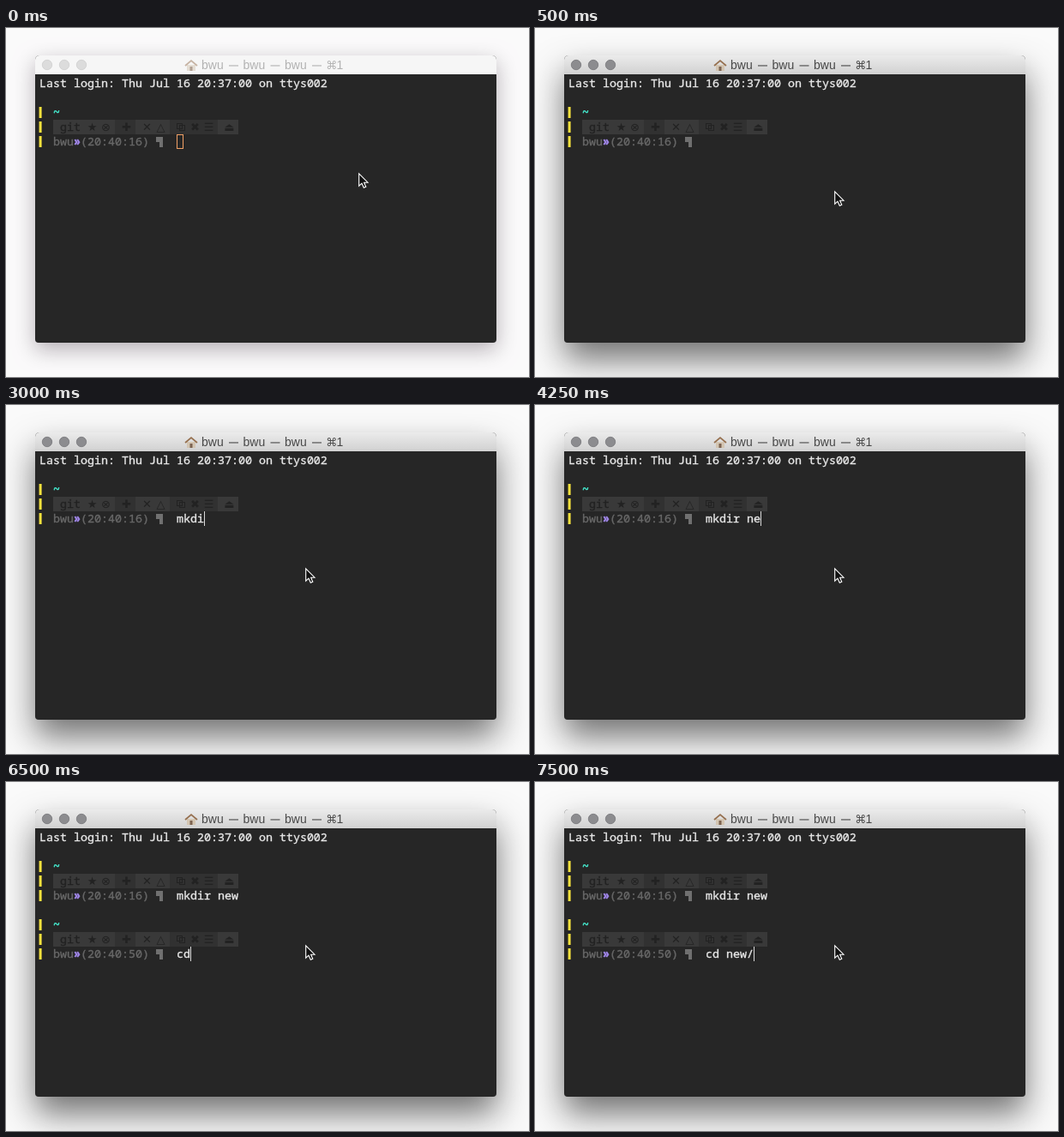
An HTML page with a canvas that plays this animation: 610 by 407 pixels, repeating every 8 s.

```html
<!DOCTYPE html>
<html lang="en">
<head>
<meta charset="utf-8">
<title>Terminal</title>
<style>
html, body { margin: 0; width: 100%; height: 100%; overflow: hidden; background: #fafafa; }
canvas { display: block; }
</style>
</head>
<body>
<canvas id="stage" width="610" height="407"></canvas>
<script>
const c = document.getElementById('stage').getContext('2d');
const LOOP = 8000, FOCUS = 500, BLINK = 500, TICK = 250;
const CELL = 8, ROW = 17, LEFT = 39, TOP = 56, CMD_COL = 20;
const WIN = { x: 34, y: 32, w: 538, h: 335, bar: 22 };
const MONO = '13.333px "Noto Sans Mono", "DejaVu Sans Mono", monospace';
const SANS = '14px "Liberation Sans", Arial, sans-serif';
const SYMBOL = '13px "DejaVu Sans", sans-serif';
const USER = 'bwu', ICONS = '★ ⊗  ✚  ✕ △    ✖ ☰  ⏏';

// Each command is typed in pairs of letters, then letter by letter.
const commands = [
  { row: 4, from: 0, clock: '20:40:16', text: 'mkdir new', start: 2500, pairs: 3, pairTime: 500 },
  { row: 8, from: 5750, clock: '20:40:50', text: 'cd new/', start: 6500, pairs: 2, pairTime: 250 }
];

const colX = col => LEFT + col * CELL;
const rowY = row => TOP + row * ROW;
const steps = (t, start, every) => Math.max(0, Math.floor((t - start) / every) + 1);

function typedCount({ text, start, pairs, pairTime }, t) {
  const paired = Math.min(pairs, steps(t, start, pairTime));
  const single = steps(t, start + pairs * pairTime, TICK);
  return Math.min(text.length, 2 * paired + single);
}

function caretOn({ text, from, start, pairs, pairTime }, t) {
  const lastKey = start + pairs * pairTime + (text.length - 2 * pairs - 1) * TICK;
  const busy = t < from + BLINK || (t >= start && t < lastKey + BLINK);
  return busy || Math.floor(t / BLINK) % 2 === 0;
}

function rect(x, y, w, h, color) {
  c.fillStyle = color;
  c.fillRect(x, y, w, h);
}

function roundRect(x, y, w, h, radii, fill) {
  c.beginPath();
  c.roundRect(x, y, w, h, radii);
  c.fillStyle = fill;
  c.fill();
}

function label(s, x, y, color, font, align = 'left') {
  c.font = font;
  c.textAlign = align;
  c.fillStyle = color;
  c.fillText(s, x, y);
}

// A hairline stroke gives the terminal font its medium weight.
function mono(s, col, row, color, weight = '') {
  const x = colX(col), y = rowY(row) + 13;
  label(s, x, y, color, weight + MONO);
  c.strokeStyle = color;
  c.lineWidth = 0.35;
  c.strokeText(s, x, y);
}

function drawHouse(active) {
  c.globalAlpha = active ? 1 : 0.5;
  rect(211, 43, 10, 7, '#d3c5b2');
  rect(214.5, 45, 3, 5, '#7d6350');
  c.beginPath();
  c.moveTo(209, 44);
  c.lineTo(216, 38);
  c.lineTo(223, 44);
  c.strokeStyle = '#96704f';
  c.lineWidth = 1.7;
  c.stroke();
  c.globalAlpha = 1;
}

function drawTitle(active) {
  const ink = active ? '#484848' : '#b2b2b2';
  drawHouse(active);
  for (let i = 0; i < 3; i++) {
    const x = 228 + i * 48.5;
    label(USER, x, 48, ink, SANS);
    rect(x + 32, 43.4, 11, 1.1, ink);
  }
  label('⌘', 373, 48, ink, SYMBOL);
  label('1', 385.5, 48, ink, SANS);
}

function drawWindow(active) {
  const { x, y, w, h, bar } = WIN;
  c.save();
  c.shadowColor = active ? 'rgba(0,0,0,.54)' : 'rgba(20,0,20,.3)';
  c.shadowBlur = active ? 38 : 24;
  c.shadowOffsetY = active ? 20 : 8;
  roundRect(x, y, w, h, [5, 5, 4, 4], '#262626');
  c.restore();

  const shade = c.createLinearGradient(0, y, 0, y + bar);
  shade.addColorStop(0, active ? '#ebebeb' : '#f6f6f6');
  shade.addColorStop(1, active ? '#d1d1d1' : '#f6f6f6');
  roundRect(x, y, w, bar, [5, 5, 0, 0], shade);

  for (let i = 0; i < 3; i++) {
    c.beginPath();
    c.arc(48 + i * 20, 43, 5.7, 0, 7);
    c.fillStyle = active ? '#8c8c8f' : '#dcdcdc';
    c.fill();
    c.strokeStyle = active ? '#77777a' : '#cecece';
    c.lineWidth = 0.8;
    c.stroke();
  }
  drawTitle(active);
}

function drawStatus(row) {
  const y = rowY(row), ink = '#222';
  rect(colX(2), y, 27 * CELL, ROW, '#393939');
  rect(colX(11), y, 3 * CELL, ROW, '#313131');
  rect(colX(19), y, 7 * CELL, ROW, '#313131');
  mono('git', 3, row, ink);
  [...ICONS].forEach((icon, i) => label(icon, colX(7 + i) + 5.5, y + 13, ink, SYMBOL, 'center'));
  c.lineWidth = 1;
  c.strokeRect(199.5, y + 4.5, 6, 6);
  c.strokeRect(202.5, y + 6.5, 6, 6);
}

function drawPrompt({ row, clock, text }, typed) {
  const y = rowY(row), x = colX(17);
  for (let r = row - 2; r <= row; r++) rect(38.6, rowY(r) + 2, 3, 13, '#f5e23c');
  mono('~', 2, row - 2, '#45ecd0', 'bold ');
  drawStatus(row - 1);
  mono(USER, 2, row, '#686868');
  mono('»', 5, row, '#a58af0', 'bold ');
  mono(`(${clock})`, 6, row, '#686868');
  rect(x, y + 3, CELL, 6, '#707070');
  rect(x + 4, y + 9, 4, 6, '#707070');
  mono(text.slice(0, typed), CMD_COL, row, '#e8e8e8');
}

function drawCaret(cmd, typed, t) {
  const x = colX(CMD_COL + typed), y = rowY(cmd.row);
  if (t < FOCUS) {
    c.strokeStyle = '#f2a065';
    c.lineWidth = 1;
    c.strokeRect(x + 0.5, y + 0.5, CELL - 1, ROW - 1);
  } else if (caretOn(cmd, t)) {
    rect(x, y, 1, ROW, '#d8d8d8');
  }
}

function drawPointer(x, y) {
  c.save();
  c.translate(x, y);
  c.fillStyle = '#111';
  c.strokeStyle = '#fff';
  c.lineWidth = 1.1;
  const arrow = new Path2D('M.7.8V15.2L4 12.2 6.3 17.3 8.8 16.2 6.6 11.2H11Z');
  c.fill(arrow);
  c.stroke(arrow);
  c.restore();
}

function draw(t) {
  rect(0, 0, 610, 407, '#fafafa');
  drawWindow(t >= FOCUS);
  mono('Last login: Thu Jul 16 20:37:00 on ttys002', 0, 0, '#e8e8e8');
  const shown = commands.filter(cmd => t >= cmd.from);
  for (const cmd of shown) drawPrompt(cmd, typedCount(cmd, t));
  const current = shown.at(-1);
  drawCaret(current, typedCount(current, t), t);
  if (t < TICK) drawPointer(411, 169);
  else drawPointer(349, 190);
}

function tick() {
  draw(performance.now() % LOOP);
  requestAnimationFrame(tick);
}
tick();
</script>
</body>
</html>
```
